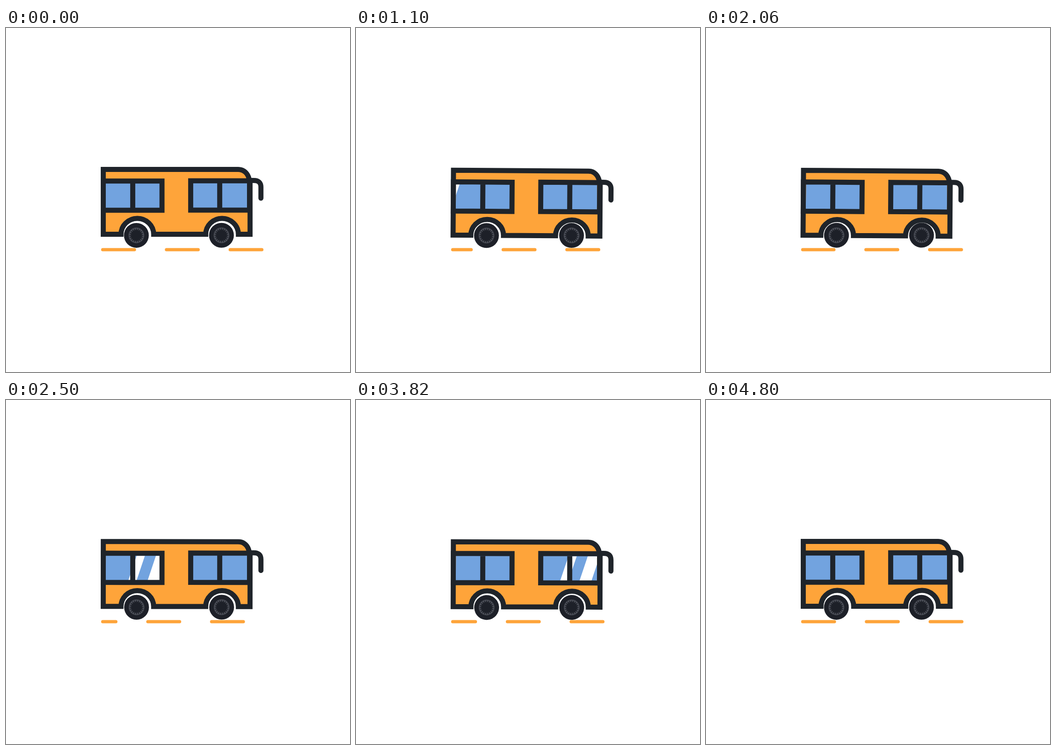
These frames come from a looping animation (748x748 px, 4820 ms). An HTML page:

```html
<!DOCTYPE html>
<html lang="en">
<head>
<meta charset="utf-8">
<title>Bus ride</title>
<style>
  html, body { margin: 0; width: 100%; height: 100%; overflow: hidden; background: #fff; }
  svg { display: block; width: 100vw; height: 100vh; }
  .line { fill: none; stroke: #1f242a; stroke-width: 11; }
  .paint { fill: #fea43a; }
  .glass { fill: #72a3df; }
</style>
</head>
<body>
<svg viewBox="0 0 748 748">
  <defs>
    <clipPath id="panes">
      <path d="M217 337H335V392H217Z M406 337H524V392H406Z"/>
    </clipPath>
    <g id="wheel">
      <circle r="27" fill="#1d2028"/>
      <circle r="17" fill="#4a4d56"/>
      <path id="hub" fill="#1d2028"/>
    </g>
  </defs>

  <path id="road" d="M210.3 482H556.3" fill="none" stroke="#fea43a" stroke-width="7"
        stroke-linecap="round" stroke-dasharray="69 69.6"/>

  <g id="bus">
    <path class="line paint" style="fill:#fea43a" d="M211.5 448.5V307.5H505C518 307.5 526 317 528.5 328L530.7 333V448.5H505.3
      A35.5 34.5 0 0 0 434.3 448.5H321.1A35.5 34.5 0 0 0 250.1 448.5Z"/>
    <path class="line" stroke-linecap="round" d="M529 331.5H539Q554.3 331.5 554.3 346V370"/>
    <g clip-path="url(#panes)">
      <path class="glass" d="M217 337H335V392H217Z M406 337H524V392H406Z"/>
      <path id="shine" fill="#fff" d="M0 0H-26L-46 60H-20Z M-50 0H-68L-88 60H-70Z"/>
    </g>
    <path class="line" d="M211.5 332.8H339.2V396.3H211.5Z M275.6 333V396
      M401.6 332.3H529.5V396H401.6Z M464.7 333V396"/>
  </g>

  <use href="#wheel" class="wheel" data-x="283.8" data-y="451"/>
  <use href="#wheel" class="wheel" data-x="468.8" data-y="450.8"/>
</svg>
<script>
  const TAU = 2 * Math.PI;
  const LOOP = 4820, RIDE = 4800, DASH = 138.6;
  const $ = id => document.getElementById(id);
  const wheels = document.querySelectorAll('.wheel');

  // toothed hub
  const teeth = 20;
  const points = Array.from({ length: teeth * 2 }, (_, i) => {
    const r = i % 2 ? 11 : 16.5, a = i * TAU / (teeth * 2);
    return `${r * Math.cos(a)} ${r * Math.sin(a)}`;
  });
  $('hub').setAttribute('d', `M${points.join('L')}Z`);

  function draw(now) {
    const t = Math.floor(now % LOOP / 20) * 20;

    $('road').setAttribute('stroke-dashoffset', 14 * DASH * t / RIDE % DASH);

    const bob = (1 - Math.cos(TAU * t / 800)) / 2;
    $('bus').setAttribute('transform', `translate(0 ${3.3 * bob}) rotate(${0.435 * bob} 371 380)`);

    const shineX = 606 - 0.635 * (t % 1600 - 500);
    $('shine').setAttribute('transform', `translate(${shineX} 338)`);

    // the wheels sit slightly off their axles
    const turn = 360 * t / 400;
    for (const w of wheels) {
      w.setAttribute('transform', `translate(${w.dataset.x} ${w.dataset.y}) rotate(${turn}) translate(-0.3 -0.1)`);
    }
  }

  function tick() {
    draw(performance.now());
    requestAnimationFrame(tick);
  }
  tick();
</script>
</body>
</html>
```
